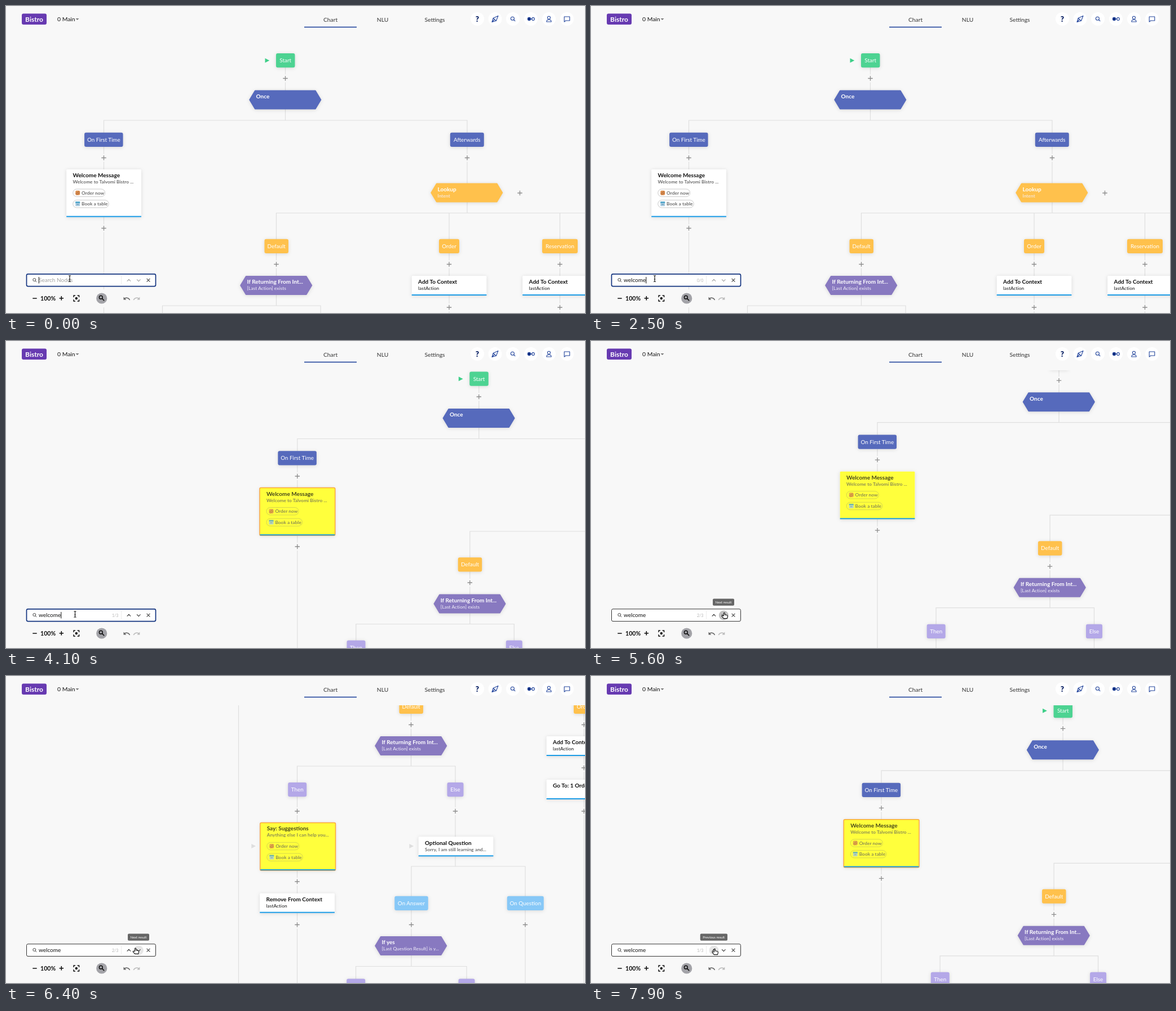
An HTML page for the animation above (8000 ms loop, 1027 by 545 pixels).

```html
<!DOCTYPE html>
<html lang="en">
<head>
<meta charset="utf-8">
<title>Flow chart search</title>
<style>
  html, body { margin: 0; width: 100%; height: 100%; overflow: hidden; background: #f8f8f8; }
  svg { display: block; width: 1027px; height: 545px; font-family: Lato, "Open Sans", sans-serif; }
  text { white-space: pre; }
  .mid { text-anchor: middle; }
  .label { font-size: 9.85px; fill: #fff; text-anchor: middle; }
  .title { font-size: 10px; font-weight: 700; }
  .sub { font-size: 8.3px; letter-spacing: .06px; }
  .soft { font-weight: 600; fill: #5a5a5a; }
  .tab { font-size: 10.3px; fill: #333; text-anchor: middle; }
  .wire { fill: none; stroke: #dfdfdf; stroke-width: 1.2; }
  .plus { stroke: #8c8c8c; stroke-width: 1.3; }
  .chip { fill: none; stroke: #777; stroke-opacity: .55; stroke-width: .7; }
  .shade { filter: drop-shadow(0 1px 3px rgba(0, 0, 0, .13)); }
  .icon { fill: none; stroke: #23459c; stroke-width: 1.1; stroke-linejoin: round; stroke-linecap: round; }
  .tip { font-size: 6px; fill: #fff; text-anchor: middle; }
</style>
</head>
<body>
<svg viewBox="0 0 1027 545">
  <clipPath id="below"><rect y="52" width="1027" height="493"/></clipPath>
  <g clip-path="url(#below)"><g id="world"></g></g>

  <g id="header">
    <rect x="28" y="13.5" width="44" height="19.5" rx="3" fill="#673ab1"/>
    <text class="mid" x="50" y="27.6" font-size="12" font-weight="700" fill="#fff">Bistro</text>
    <text x="91" y="26.7" font-size="10.4" fill="#111">0 Main</text>
    <path d="M123.5 22h6l-3 3z" fill="#777"/>
    <text class="tab" x="575.5" y="27.5">Chart</text>
    <text class="tab" x="668" y="27.5">NLU</text>
    <text class="tab" x="760.5" y="27.5">Settings</text>
    <rect x="529" y="36.7" width="93" height="1.6" fill="#1f429b"/>
    <g id="discs" fill="#fff"></g>
    <text class="mid" x="836" y="27.8" font-size="13.5" font-weight="900" fill="#0b2265">?</text>
    <g class="icon">
      <path d="M862 28.5l2.2-7 8.8-4-3.6 8.8zM862 28.5l4.5-4.5M864.2 21.5l5.2 4.8"/>
      <circle cx="898.4" cy="22.2" r="3"/><path d="M900.7 24.5l2.2 2.2"/>
      <path d="M930 23h3"/><circle cx="935" cy="23" r="2.4"/><circle cx="928" cy="23" r="2.6" fill="#0f2c7d"/>
      <circle cx="963" cy="20.8" r="2.5"/><path d="M958.8 28c0-5 8.4-5 8.4 0z"/>
      <path d="M990.2 19h9.6v7h-7l-2.6 2.2z"/>
    </g>
  </g>

  <g id="tools">
    <rect x="36" y="503" width="230" height="32" fill="#f8f8f8"/>
    <g fill="none" stroke="#111" stroke-width="1.6">
      <path d="M47.3 519h7.4M94.5 518.8h7.6M98.3 515v7.6"/>
      <path d="M120 517v-3h3M126.600 514h3v3M129.600 521v3h-3M123 524h-3v-3" stroke-width="1.4"/>
    </g>
    <circle cx="124.800" cy="519" r="2.200" fill="#111"/>
    <text class="mid" x="74.600" y="522.600" font-size="10.600" font-weight="700" fill="#111">100%</text>
    <circle cx="169.700" cy="519" r="9.600" fill="#a3a3a8"/>
    <g fill="none" stroke="#111" stroke-width="1.5">
      <circle cx="168.300" cy="517.200" r="2.900"/><path d="M170.500 519.400l3.700 3.700"/>
    </g>
    <g fill="none" stroke-width="1.5">
      <path d="M209.500 520c3-3 8-2.500 10 2" stroke="#666"/><path d="M208.500 516.500v5h5z" fill="#666"/>
      <path d="M236.300 520c-3-3-8-2.500-10 2" stroke="#bbb"/><path d="M237.300 516.500v5h-5z" fill="#bbb"/>
    </g>
  </g>

  <g id="search">
    <rect id="field" x="36.500" y="475.800" width="229" height="21.800" rx="2.500" fill="#fff"/>
    <g fill="none" stroke="#444"><circle cx="50.300" cy="486" r="2.500"/><path d="M52.100 487.900l2.200 2.200"/></g>
    <text id="query" x="58" y="490.300" font-size="10"></text>
    <rect id="caret" y="481" width="1" height="11.500" fill="#111"/>
    <text id="count" x="199.300" y="489.700" font-size="7" text-anchor="end" fill="#b3b3b3"></text>
    <path d="M204.500 479v15" stroke="#ececec"/>
    <circle id="hover" cy="487" r="8.500"/>
    <g fill="none" stroke-width="1.300">
      <path id="arrows" d="M214.700 488.600l3.200-3.200 3.200 3.200M232.100 485.400l3.200 3.200 3.200-3.200"/>
      <path d="M249.600 483.900l5.800 5.800M255.400 483.900l-5.800 5.800" stroke="#444" stroke-width="1.100"/>
    </g>
  </g>
  <g id="nextTip"><rect x="216" y="457.500" width="38" height="12.300" rx="2" fill="#666"/><text class="tip" x="235" y="465.800">Next result</text></g>
  <g id="prevTip"><rect x="193.700" y="457.500" width="48.300" height="12.300" rx="2" fill="#666"/><text class="tip" x="217.800" y="465.800">Previous result</text></g>

  <path id="beam" d="M-2-5.500q2 0 2 1.500q0-1.500 2-1.500M0-4v8M-2 5.500q2 0 2-1.500q0 1.500 2 1.500M-1.200 1h2.400" fill="none" stroke="#111" stroke-width="1.100"/>
  <path id="hand" d="M-1.600 1v-5q1-1.500 2 0v3l4 .8q1.200.4 1 2l-.8 3.800h-6.200l-3.400-4q0-1.600 1.600-1z" fill="#fff" stroke="#111" stroke-width="1.100" stroke-linejoin="round"/>
</svg>
<script>
const $ = id => document.getElementById(id);
const BLUE = '#566abc', AMBER = '#ffc14c', VIOLET = '#8879c0', LILAC = '#b4a8e8', SKY = '#87c8f7';

const wire = d => `<path class="wire" d="${d}"/>`;
const text = (x, y, cls, s, fill = '#111') => `<text x="${x}" y="${y}" class="${cls}" fill="${fill}">${s}</text>`;
const plus = (x, y) =>
  `<rect x="${x - 5}" y="${y - 7}" width="10" height="14" fill="#f8f8f8"/><path class="plus" d="M${x - 4.2} ${y}h8.4M${x} ${y - 4.2}v8.4"/>`;
const play = (x, y, fill) => `<path d="M${x - 3.7} ${y - 4}l7.800 4-7.800 4z" fill="${fill}"/>`;
const button = (cx, y, w, fill, s) =>
  `<rect class="shade" x="${cx - w / 2}" y="${y}" width="${w}" height="25.300" rx="3" fill="${fill}"/>` + text(cx, y + 16.1, 'label', s);
const hex = (cx, y, fill, title, sub = '') =>
  `<path class="shade" d="M${cx - 63} ${y + 17}l9.600-16h106.800l9.600 16-9.600 16h-106.800z" fill="${fill}" stroke="${fill}" stroke-width="2" stroke-linejoin="round"/>` +
  text(cx - 51.7, y + 14.4, 'title', title, '#fff') + text(cx - 51.7, y + 25, 'sub', sub, '#f4f1fa');
const card = (x, y, title, sub, soft) =>
  `<g class="shade"><rect x="${x}" y="${y}" width="132.700" height="34.800" rx="1.500" fill="#fff"/>
  <rect x="${x}" y="${y + 33}" width="132.700" height="2" fill="#1c9ce6"/></g>` +
  text(x + 11.4, y + 14.3, 'title', title) + text(x + 11.4, y + 25.2, soft ? 'sub soft' : 'sub', sub);

const chip = (x, y, w, icon, s) =>
  `<rect class="chip" x="${x}" y="${y}" width="${w}" height="13.400" rx="6.700"/>${icon(x + 4.5, y + 2.7)}` + text(x + 15.4, y + 9.7, 'sub soft', s);
const burger = (x, y) =>
  `<rect x="${x}" y="${y}" width="8" height="8" rx="2" fill="#dd9150"/><path d="M${x + .5} ${y + 5.5}l6-4M${x + 2} ${y + 7.3}l5.500-3.500" stroke="#a9603a"/>`;
const calendar = (x, y) =>
  `<rect x="${x}" y="${y}" width="8" height="8" rx="1" fill="#a9cbe0"/><rect x="${x}" y="${y}" width="8" height="2.500" fill="#4aa3c9"/><path d="M${x + 2} ${y + 5}h4" stroke="#5b8fae"/>`;
const messageCard = (id, x, y, title, sub) =>
  `<g class="shade"><rect x="${x}" y="${y}" width="132.700" height="84.500" rx="1.500" fill="#fff"/>
  <rect id="${id}Glow" x="${x}" y="${y}" width="132.700" height="84.500" rx="1.500" fill="#ffff3c"/></g>
  <rect id="${id}Edge" x="${x - .5}" y="${y}" width="133.700" height="84.800" rx="2" fill="none" stroke="#fba73a" stroke-width="1.500"/>
  <rect x="${x}" y="${y + 82.7}" width="132.700" height="2" fill="#1c9ce6"/><g id="${id}Text">` +
  text(x + 11.4, y + 14, 'title', title) + text(x + 11.4, y + 25, 'sub soft', sub) +
  chip(x + 11.5, y + 35, 57, burger, 'Order now') + chip(x + 11.5, y + 54.6, 63.5, calendar, 'Book a table') + '</g>';

$('world').innerHTML = [
  wire('M495.500 109V203M173.500 225V203H818V315M173.500 250V1200'),
  wire('M818 348V367.500M479.500 532V367.500H1400M786 367.500V1200M982.500 367.500V1200'),
  wire('M277.500 1200V532H558V710M480 834V710H682V1200M480 868V887.500M381.500 910V887.500H578V910'),
  plus(495.5, 128.5), plus(173.5, 269.5), plus(173.5, 394.5), plus(818, 269.5), plus(911.5, 332),
  ...[479.5, 786, 982.5].map(x => plus(x, 458.5)),
  ...[786, 982.5].map(x => plus(x, 535)),
  ...[277.5, 558, 786].map(x => plus(x, 612)),
  plus(277.5, 737),
  ...[277.5, 480, 682].map(x => plus(x, 813.5)),
  play(463.2, 96.8, '#3ecf88'), play(200, 674, '#dedede'), play(480, 674, '#dedede'),
  button(495.7, 84, 33.5, '#4dd392', 'Start'),
  hex(495.3, 149.5, BLUE, 'Once'),
  button(173.3, 224.8, 68.5, BLUE, 'On First Time'),
  button(817.8, 224.8, 60, BLUE, 'Afterwards'),
  hex(817.3, 314.5, AMBER, 'Lookup', 'Intent'),
  button(479.7, 413.7, 42.5, AMBER, 'Default'),
  button(786, 413.7, 36, AMBER, 'Order'),
  button(982.5, 413.7, 63, AMBER, 'Reservation'),
  hex(479.2, 479, VIOLET, 'If Returning From Int...', '[Last Action] exists'),
  card(719.7, 479, 'Add To Context', 'lastAction'),
  card(916.2, 479, 'Add To Context', 'lastAction'),
  card(719.7, 556, 'Go To: 1 Order', ''),
  messageCard('hello', 107.2, 290, 'Welcome Message', 'Welcome to Talvomi Bistro ...'),
  button(277.7, 561, 33, LILAC, 'Then'),
  button(558, 561, 29, LILAC, 'Else'),
  messageCard('say', 212.3, 632.4, 'Say: Suggestions', 'Anything else I can help you...'),
  card(211.2, 757.7, 'Remove From Context', 'lastAction'),
  card(492.7, 657.3, 'Optional Question', 'Sorry, I am still learning and...', true),
  button(480, 762.7, 59.5, SKY, 'On Answer'),
  button(682.3, 762.7, 65, SKY, 'On Question'),
  hex(479.2, 834, VIOLET, 'If yes', '[Last Question Result] is y...'),
  button(381.7, 909.5, 33, LILAC, 'Then'),
  button(578, 909.5, 29, LILAC, 'Else'),
].join('');
$('discs').innerHTML = [836, 867.5, 899, 931, 963, 995].map(x => `<circle cx="${x}" cy="23" r="12"/>`).join('');

const LOOP = 8000, STEP = 100;
const WELCOME = [343.3, -29.5], SUGGEST = [239, -372];
const moves = [[3170, 530, WELCOME], [5483, 570, SUGGEST], [7500, 440, WELCOME]];
const pointer = [[4000, 113, 484], [4100, 122.5, 485], [4500, 172, 477], [4900, 237, 487], [6200, 237, 487], [6700, 220, 489]];

const clamp = v => Math.min(1, Math.max(0, v));
const ease = p => p < .5 ? 2 * p * p : 1 - 2 * (1 - p) ** 2;
const within = (t, a, b) => t >= a && t < b;
const show = (id, on) => $(id).setAttribute('opacity', +on);
const place = (id, x, y) => $(id).setAttribute('transform', `translate(${x} ${y})`);
const latest = (t, list) => list.filter(([at]) => at <= t).pop()[1];

function camera(t) {
  return moves.reduce((pos, [at, span, to]) => {
    const p = ease(clamp((t - at) / span));
    return pos.map((v, i) => v + (to[i] - v) * p);
  }, [0, 0]);
}

function along(points, t) {
  const i = points.findIndex(([at]) => at > t);
  if (i === 0) return points[0].slice(1);
  if (i < 0) return points[points.length - 1].slice(1);
  const [a, x, y] = points[i - 1], [b, u, v] = points[i], p = (t - a) / (b - a);
  return [x + (u - x) * p, y + (v - y) * p];
}

// The yellow lingers briefly after the outline has moved on.
function highlight(id, t, spans) {
  const glow = Math.max(...spans.map(([a, b]) => t < a ? 0 : clamp(1 - (t - b - 100) / 300)));
  show(id + 'Glow', glow);
  show(id + 'Edge', spans.some(([a, b]) => within(t, a, b)));
  show(id + 'Text', 1 - .22 * glow);
}

function draw(t) {
  place('world', ...camera(t));
  highlight('hello', t, [[3200, 5500], [7600, 9000]]);
  highlight('say', t, [[5500, 7600]]);

  const typed = 'welcome'.slice(0, latest(t, [[0, 0], [1100, 2], [1900, 4], [2100, 5], [2500, 7]]));
  const query = $('query');
  query.textContent = typed || 'Search Nodes';
  query.setAttribute('fill', typed ? '#111' : '#a2a2a2');
  $('caret').setAttribute('x', 58 + (typed ? query.getComputedTextLength() : -.2));
  show('caret', t < 5000 && ![[500, 1100], [3000, 3500], [4500, 5000]].some(([a, b]) => within(t, a, b)));
  $('count').textContent = latest(t, [[0, ''], [1100, '0/0'], [3000, '1/3'], [5500, '2/3'], [7600, '1/3']]);
  $('arrows').setAttribute('stroke', t < 3200 ? '#a8a8a8' : '#444');

  const focused = t < 5100;
  $('field').setAttribute('stroke', focused ? '#12337f' : '#333');
  $('field').setAttribute('stroke-width', focused ? 1.7 : 1);

  const pressed = within(t, 5300, 5700) || within(t, 7400, 7700);
  $('hover').setAttribute('cx', t < 6500 ? 235.3 : 218);
  $('hover').setAttribute('fill', pressed ? '#c2c2c2' : '#e6e6e6');
  show('hover', t >= 5000);
  show('nextTip', within(t, 5100, 6500));
  show('prevTip', t >= 6700);

  const [x, y] = along(pointer, t);
  place('beam', x, y);
  place('hand', x, y);
  show('beam', x < 205);
  show('hand', x >= 205);
}

const start = performance.now();
function tick() {
  const t = (performance.now() - start) % LOOP;
  draw(Math.floor(t / STEP) * STEP);
  requestAnimationFrame(tick);
}
tick();
</script>
</body>
</html>
```
